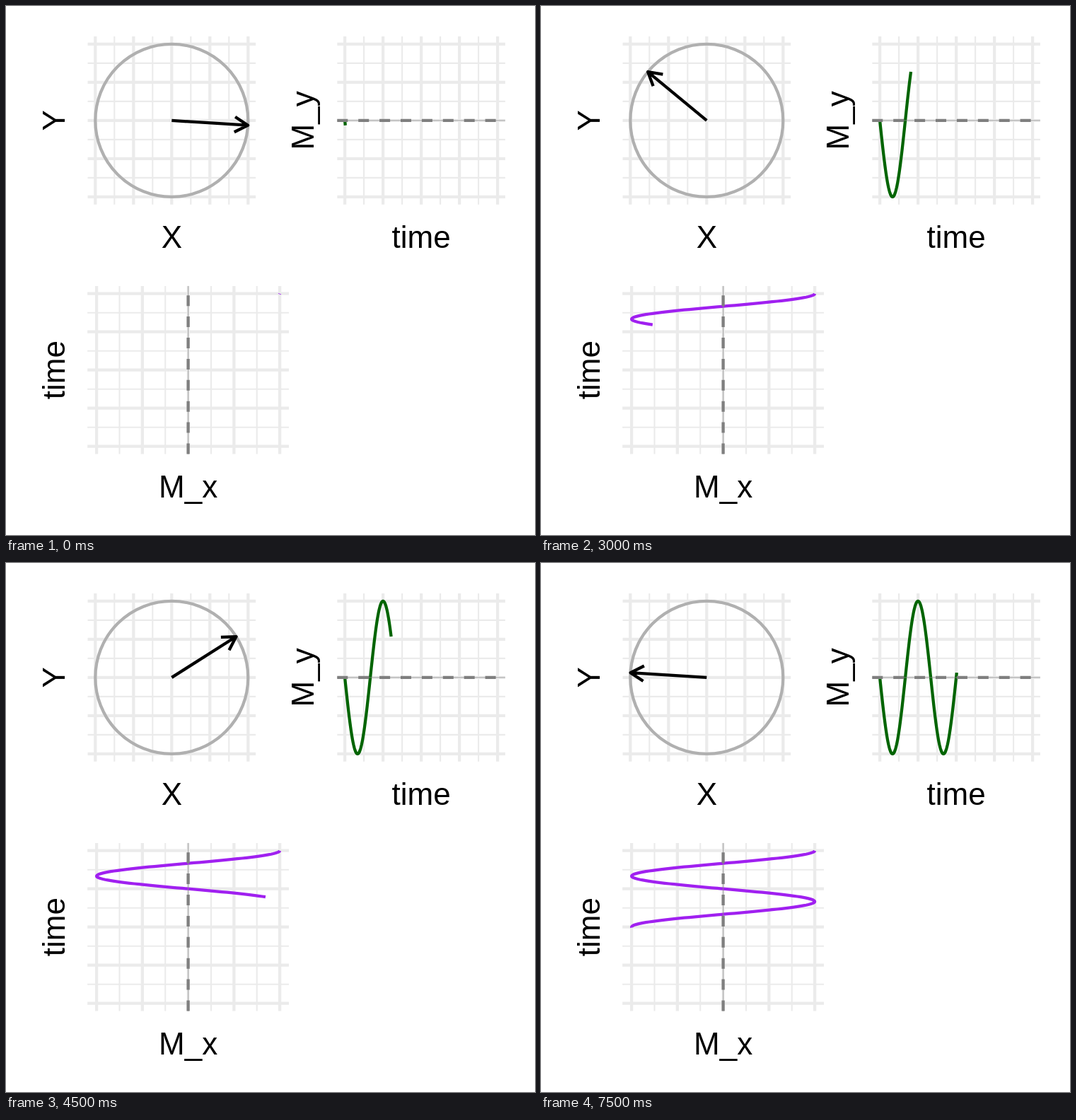
Animation, 748 px wide and 748 px high, one loop 8 s. Source, as an HTML page:

```html
<!DOCTYPE html>
<html lang="en">
<head>
<meta charset="utf-8">
<title>Rotating vector and its components</title>
<style>
  html, body { margin: 0; width: 100%; height: 100%; overflow: hidden; background: #fff; }
  svg { display: block; width: 100%; height: 100%; }
  text { font: 44px "Liberation Sans", Arial, sans-serif; text-anchor: middle; }
  path, circle { fill: none; stroke-width: 4.27; stroke-linejoin: round; }
</style>
</head>
<body>
<svg id="stage" viewBox="0 0 748 748"></svg>
<script>
const STEP_MS = 500, STEPS = 16;
const SAMPLE_DEG = 3.6, SAMPLES_PER_STEP = 10;
const SPAN = 216, CYCLES = 3;
const RADIUS = SPAN / 2, HEAD = 21.6;

const stage = document.getElementById('stage');
const circlePlot = { cx: 234.3, cy: 161.9, w: SPAN, h: SPAN };
const yPlot = { cx: 587.1, cy: 161.9, w: SPAN, h: SPAN };
const xPlot = { cx: 257.6, cy: 514.7, w: 259, h: SPAN };

function add(tag, attrs, text = '') {
  const el = document.createElementNS('http://www.w3.org/2000/svg', tag);
  for (const key in attrs) el.setAttribute(key, attrs[key]);
  el.textContent = text;
  stage.append(el);
  return el;
}

// Nine grid lines each way, every second one major, with a 5% margin.
function grid({ cx, cy, w, h }) {
  const halfW = w * 0.55, halfH = h * 0.55;
  for (let i = -4; i <= 4; i++) {
    const x = cx + i * w / 8, y = cy + i * h / 8;
    add('path', {
      d: `M${x} ${cy - halfH}v${2 * halfH}M${cx - halfW} ${y}h${2 * halfW}`,
      stroke: '#ebebeb',
      style: `stroke-width:${i % 2 ? 2.13 : 4.27}`
    });
  }
}

function label(text, x, y, turn = 0) {
  add('text', { transform: `translate(${x} ${y}) rotate(${turn})` }, text);
}

function zeroLine(d) {
  add('path', { d, stroke: '#8c8c8c', style: 'stroke-width:0.8' });
  add('path', { d, stroke: '#7f7f7f', 'stroke-dasharray': '15 14.9' });
}

[circlePlot, yPlot, xPlot].forEach(grid);
add('circle', { cx: circlePlot.cx, cy: circlePlot.cy, r: RADIUS, stroke: '#b0b0b0' });
const arrow = add('path', { stroke: '#000' });
const yCurve = add('path', { stroke: '#006400' });
const xCurve = add('path', { stroke: '#a020f0' });
zeroLine(`M${yPlot.cx - yPlot.w * 0.55} ${yPlot.cy}h${yPlot.w * 1.1}`);
zeroLine(`M${xPlot.cx} ${xPlot.cy + xPlot.h * 0.55}v${-xPlot.h * 1.1}`);

label('X', circlePlot.cx, 342);
label('time', yPlot.cx, 342);
label('M_x', xPlot.cx, 695);
label('Y', 82.5, circlePlot.cy, -90);
label('M_y', 435.3, yPlot.cy, -90);
label('time', 82.5, xPlot.cy, -90);

const radians = deg => deg * Math.PI / 180;
const elapsed = deg => SPAN * deg / (360 * CYCLES);

function arrowPath(deg) {
  const { cx, cy } = circlePlot;
  const tipX = cx + RADIUS * Math.cos(radians(deg));
  const tipY = cy + RADIUS * Math.sin(radians(deg));
  const barb = turn => {
    const a = radians(deg + turn);
    return `${tipX + HEAD * Math.cos(a)} ${tipY + HEAD * Math.sin(a)}`;
  };
  return `M${cx} ${cy}L${tipX} ${tipY}M${barb(150)}L${tipX} ${tipY}L${barb(210)}`;
}

function curvePath(samples, point) {
  const points = [];
  for (let i = 0; i <= samples; i++) points.push(point(i * SAMPLE_DEG).join(' '));
  return 'M' + points.join('L');
}

function draw(ms) {
  const step = Math.floor(ms / STEP_MS) % STEPS;
  const samples = step * SAMPLES_PER_STEP + 1;
  arrow.setAttribute('d', arrowPath(samples * SAMPLE_DEG));
  yCurve.setAttribute('d', curvePath(samples, deg => [
    yPlot.cx - yPlot.w / 2 + elapsed(deg),
    yPlot.cy + yPlot.h / 2 * Math.sin(radians(deg))
  ]));
  xCurve.setAttribute('d', curvePath(samples, deg => [
    xPlot.cx + xPlot.w / 2 * Math.cos(radians(deg)),
    xPlot.cy - xPlot.h / 2 + elapsed(deg)
  ]));
}

const start = performance.now();
function tick() {
  draw(performance.now() - start);
  requestAnimationFrame(tick);
}
tick();
</script>
</body>
</html>
```
